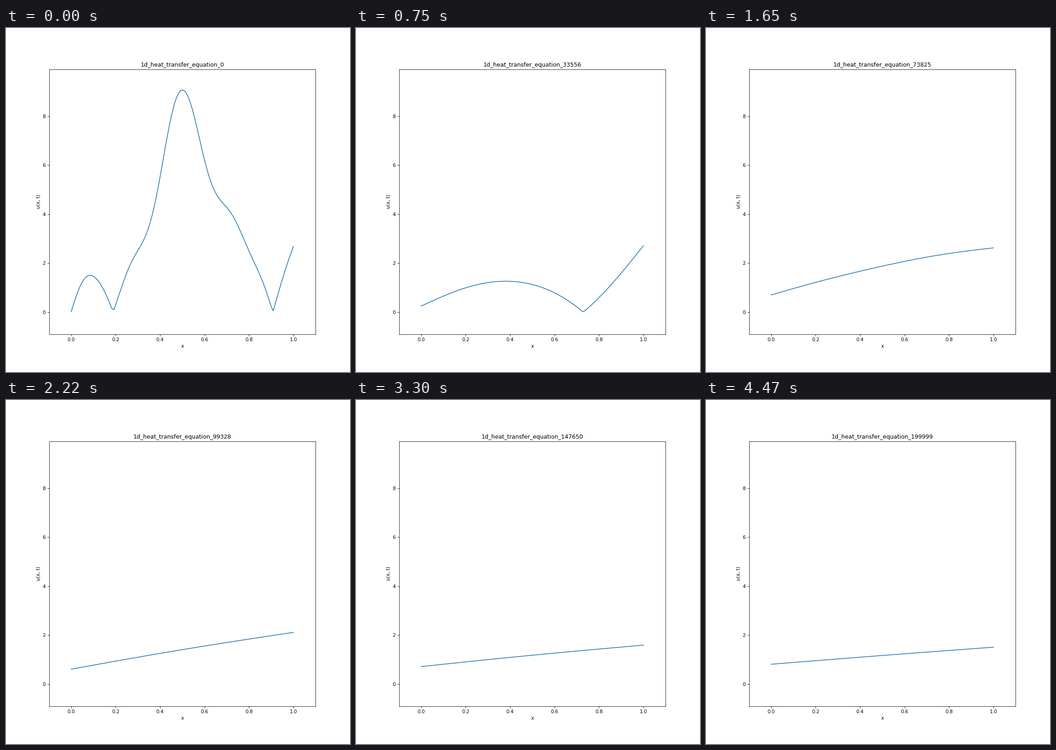
A matplotlib script for the animation above (4.5 s loop, 748 by 748 pixels).

```python
import numpy as np
import matplotlib.pyplot as plt
from matplotlib.animation import FuncAnimation

INCHES, DPI = 10, 74.8
FRAMES, INTERVAL = 150, 30
STEPS = 200000
POINTS = 100
DIFFUSION = 0.0268   # per frame
PRESMOOTH = 0.25

x = np.linspace(0, 1, POINTS)

# Initial state: a line between the end values plus a sine series.
LEFT, RIGHT = 0.02, 2.68
SERIES = np.array([-7.10, 1.85, 1.91, 0.62, -0.48, 0.18, 0.66, 0.12, -0.22,
                   -0.04, 0.10, 0, 0.05])
modes = np.arange(1, len(SERIES) + 1)
sines = np.sin(np.pi * np.outer(modes, x))

# The smooth share drifts between key poses, the rest dies out by diffusion.
smooth = SERIES * np.exp(-PRESMOOTH * modes**2)
rough = SERIES - smooth

# frame: left end, right end, first three sine amplitudes
POSES = {
    0: [LEFT, RIGHT, *smooth[:3]],
    15: [-1.84, 2.57, -3.82, 0.04, -0.11],
    35: [1.35, 2.84, -1.12, 0.16, 0.05],
    55: [0.70, 2.62, 0.225, -0.014, 0.01],
    74: [0.61, 2.11, 0.045, 0, 0],
    110: [0.715, 1.59, 0.025, 0, 0],
    149: [0.81, 1.505, 0.01, 0, 0],
}
times = np.array(list(POSES))
poses = np.array(list(POSES.values()))


def key_slopes():
    """Monotone slopes in time: harmonic means, zero at turning points."""
    secants = np.diff(poses, axis=0) / np.diff(times)[:, None]
    a, b = secants[:-1], secants[1:]
    same = a * b > 0
    inner = np.where(same, 2 * a * b / np.where(same, a + b, 1), 0)
    return np.vstack([secants[:1], inner, secants[-1:]])


slopes = key_slopes()


def pose(i):
    """Cubic Hermite blend of the neighbouring key poses."""
    k = min(np.searchsorted(times, i, side="right") - 1, len(times) - 2)
    span = times[k + 1] - times[k]
    t = (i - times[k]) / span
    return ((1 + 2 * t) * (1 - t)**2 * poses[k]
            + t * (1 - t)**2 * span * slopes[k]
            + t**2 * (3 - 2 * t) * poses[k + 1]
            - t**2 * (1 - t) * span * slopes[k + 1])


def temperature(i):
    left, right, *bumps = pose(i)
    fade = max(0, 1 - i / times[1])
    amps = rough * fade * np.exp(-DIFFUSION * (np.pi * modes)**2 * i)
    amps[:3] += bumps
    return left + (right - left) * x + amps @ sines


fig, ax = plt.subplots(figsize=(INCHES, INCHES), dpi=DPI)
curve, = ax.plot(x, np.abs(temperature(0)))
ax.set_xlim(-0.1, 1.1)
ax.set_ylim(-0.901, 9.91)
ax.set_yticks(range(0, 10, 2))
ax.set_xlabel("x")
ax.set_ylabel("u(x, t)")
title = ax.set_title("")


def update(i):
    curve.set_ydata(np.abs(temperature(i)))
    step = i * (STEPS - 1) // (FRAMES - 1)
    title.set_text(f"1d_heat_transfer_equation_{step}")
    return curve, title


anim = FuncAnimation(fig, update, frames=FRAMES, interval=INTERVAL,
                     repeat=True, repeat_delay=0, blit=False)
plt.show()
```
